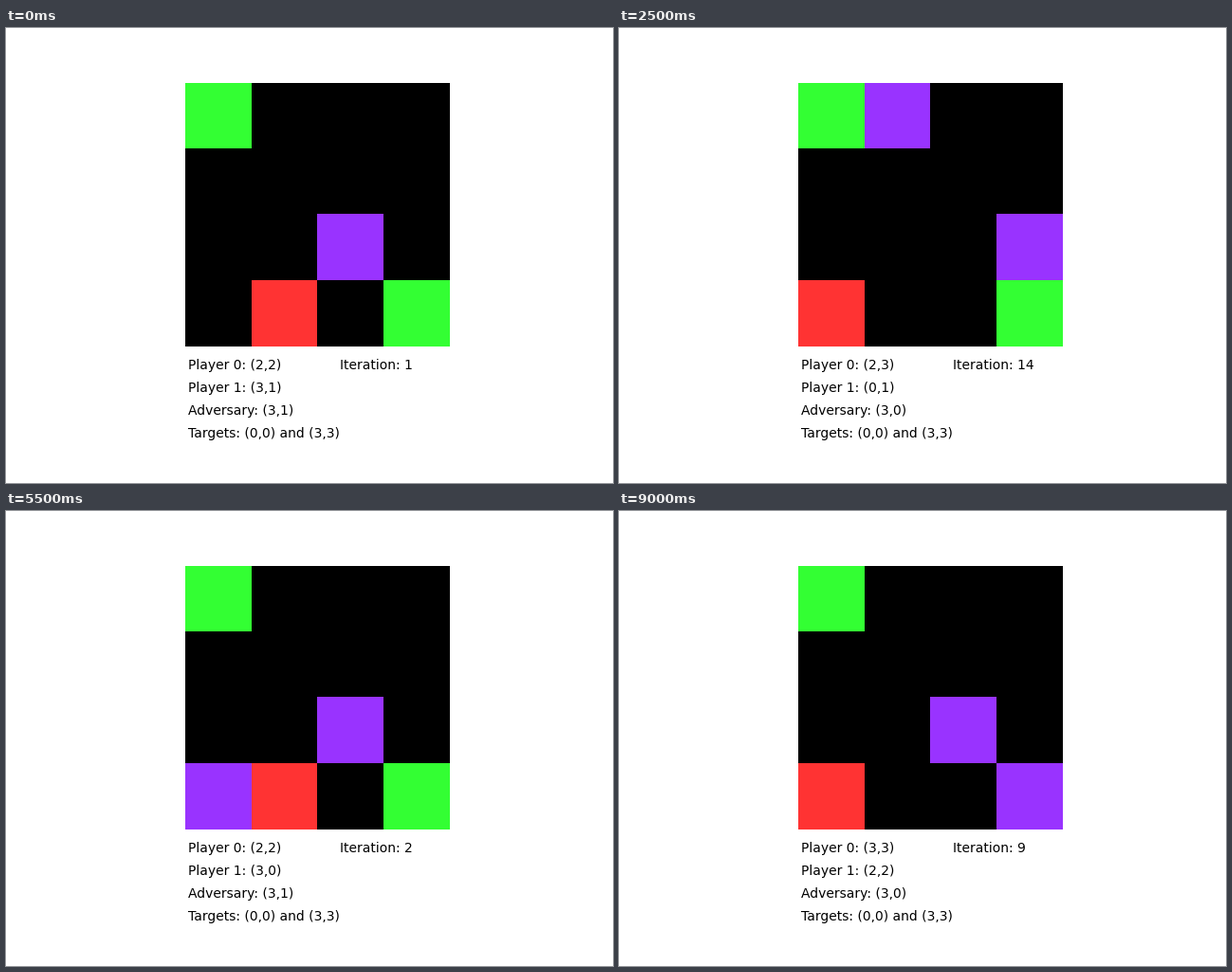
Recreate the animation shown at these times as a matplotlib script. Size 640 px wide and 480 px high, loop 9500 ms.

```python
import numpy as np
import matplotlib.pyplot as plt
from matplotlib.animation import FuncAnimation

plt.rcParams["font.family"] = "DejaVu Sans"

SIZE = 4
GREEN, PURPLE, RED = (51, 255, 51), (153, 51, 255), (255, 51, 51)
TARGETS = [(0, 0), (3, 3)]

# One two-digit "row column" entry per iteration, 1 to 19.
PLAYER_0 = "22 22 32 32 32 32 32 33 33 23 33 23 13 23 33 33 33 23 33"
PLAYER_1 = "31 30 30 31 31 21 20 21 22 21 11 01 01 01 01 01 11 10 00"
ADVERSARY = "31 31 31 30 20 30 30 20 30 30 30 31 31 30 31 21 31 30 30"


def parse(path):
    return [(int(cell[0]), int(cell[1])) for cell in path.split()]


paths = [parse(p) for p in (PLAYER_0, PLAYER_1, ADVERSARY)]

# The iterations play in alphabetical order: 1, 10, 11, ..., 2, 3, ...
order = sorted(range(1, len(paths[0]) + 1), key=str)


def show(cell):
    return "({},{})".format(*cell)


def board(p0, p1, adv):
    grid = np.zeros((SIZE, SIZE, 3), dtype=np.uint8)
    for cell in TARGETS:
        grid[cell] = GREEN
    grid[p0] = grid[p1] = PURPLE
    grid[adv] = RED
    return grid


fig, ax = plt.subplots(figsize=(6.4, 4.8), dpi=100)
fig.subplots_adjust(left=0.125, right=0.9, top=0.88, bottom=0.3)
ax.axis("off")
image = ax.imshow(np.zeros((SIZE, SIZE, 3), dtype=np.uint8),
                  interpolation="nearest")

labels = [fig.text(0.3, y, "", fontsize=10) for y in (0.25, 0.2, 0.15)]
counter = fig.text(0.55, 0.25, "", fontsize=10)
fig.text(0.3, 0.1, "Targets: " + " and ".join(map(show, TARGETS)), fontsize=10)


def update(i):
    step = order[i]
    cells = [path[step - 1] for path in paths]
    image.set_data(board(*cells))
    for label, name, cell in zip(labels, ("Player 0", "Player 1", "Adversary"), cells):
        label.set_text(f"{name}: {show(cell)}")
    counter.set_text(f"Iteration: {step}")
    return [image, counter, *labels]


anim = FuncAnimation(fig, update, frames=len(order), interval=500,
                     repeat=True, repeat_delay=0)
plt.show()
```
